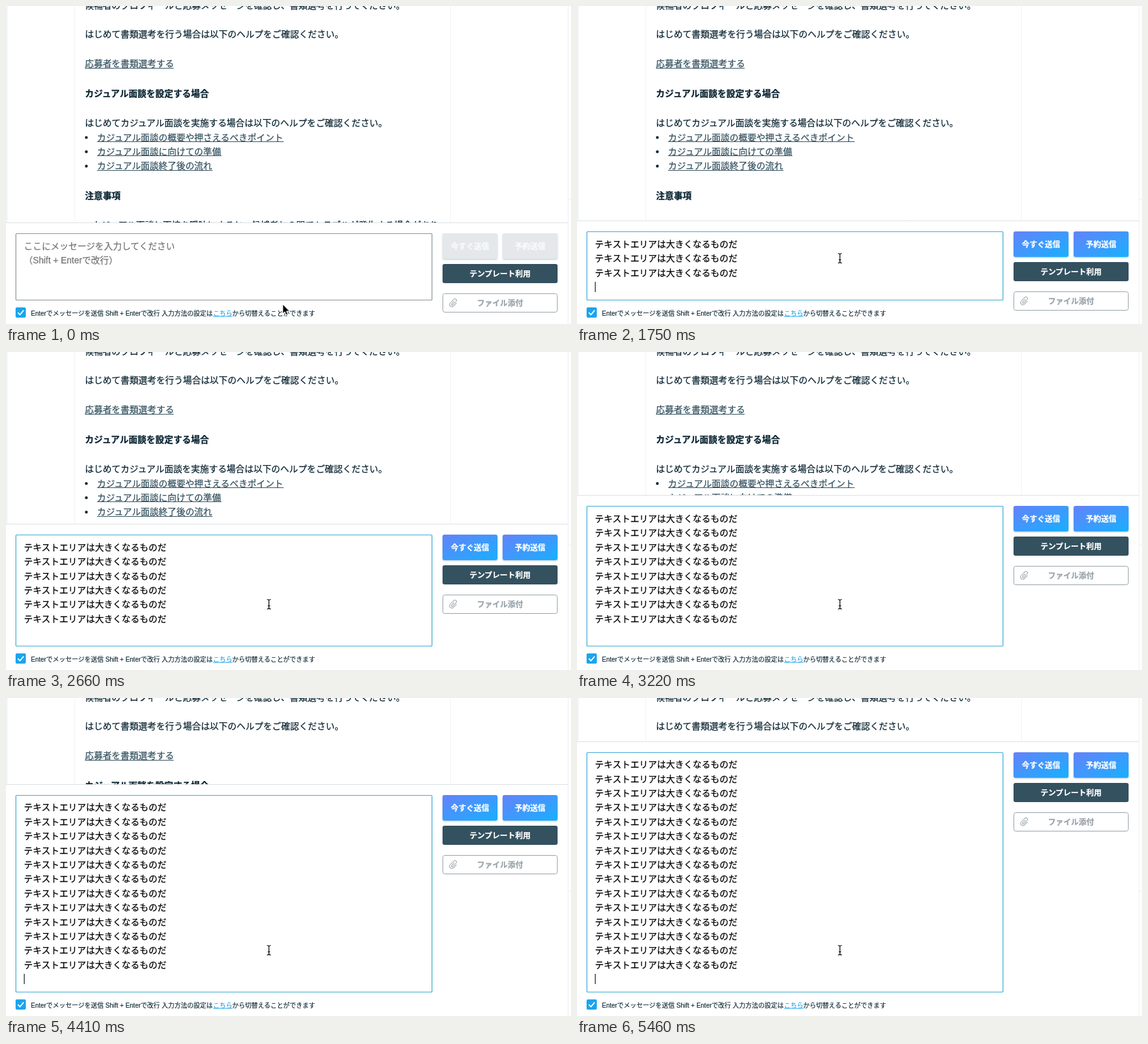
Recreate the animation shown at these times as an HTML page. Size 884x498 px, loop 5.6 s.

```html
<!DOCTYPE html>
<html lang="ja">
<head>
<meta charset="utf-8">
<style>
  html, body { margin: 0; width: 100%; height: 100%; overflow: hidden; background: #fff; }
  svg { display: block; width: 100vw; height: 100vh; }
  text {
    font: 13.96px "Liberation Sans", "Noto Sans CJK JP", "Noto Sans CJK", sans-serif;
    fill: var(--ink); stroke: var(--ink); stroke-width: .25px; white-space: pre; --ink: #0b2533;
  }
  .bold { font-weight: 700; }
  .link { --ink: #34515f; }
  .hint { --ink: #757575; }
  .typed { --ink: #000; }
  .button { font-size: 12px; font-weight: 700; --ink: #fff; text-anchor: middle; }
  .muted { --ink: #98a3a9; }
  .small { font-size: 10px; stroke-width: .15px; }
  .accent { --ink: #1ba5ee; }
</style>
</head>
<body>
<svg viewBox="0 0 884 498">
  <defs>
    <linearGradient id="blue" x1="0" y1="0" x2="1" y2="1">
      <stop offset="0" stop-color="#6482fa"/><stop offset="1" stop-color="#18b0ff"/>
    </linearGradient>
    <linearGradient id="edge">
      <stop offset="0" stop-color="#e9f0f1"/><stop offset="1" stop-color="#fff"/>
    </linearGradient>
    <filter id="shadow" x="-10%" y="-10%" width="120%" height="140%">
      <feDropShadow dx="0" dy="1.2" stdDeviation="1" flood-color="#2a5f85" flood-opacity=".32"/>
    </filter>
    <path id="beamShape" d="M-3 -7.5Q0 -7.5 0 -5.5Q0 -7.5 3 -7.5M0 -5.5V5.5M-3 7.5Q0 7.5 0 5.5Q0 7.5 3 7.5M-1.8 2.5H1.8"/>
  </defs>

  <rect width="884" height="498" fill="#fff"/>
  <rect width="4" height="498" fill="url(#edge)"/>
  <path d="M107.5 0V498M695.5 0V498" stroke="#f1f3f4"/>
  <path d="M879.5 0V498M879 302.5H884" stroke="#eceff0"/>
  <g id="article"></g>

  <rect id="panel" width="879" height="498" fill="#fff"/>
  <rect id="divider" width="879" height="1" fill="#dde2e5"/>
  <rect id="field" x="15.5" width="651" rx="1" fill="#fff" stroke-width="1.2"/>
  <g id="hint"></g>
  <g id="typed"></g>
  <rect id="caret" x="28" width="1" height="16" fill="#000"/>

  <g id="actions">
    <g id="send" filter="url(#shadow)">
      <rect x="683" width="86" height="40" rx="3"/>
      <rect x="777" width="86" height="40" rx="3"/>
    </g>
    <rect x="683" y="48" width="180" height="30" rx="3" fill="#34515f"/>
    <rect x="683.5" y="94.5" width="179" height="29" rx="3" fill="#fff" stroke="#98a3a9"/>
    <path transform="translate(700 109) rotate(45)" fill="none" stroke="#98a3a9" stroke-linecap="round"
      d="M3.5 -3V3.5A3.5 3.5 0 0 1 -3.5 3.5V-4.5A2.4 2.4 0 0 1 1.3 -4.5V3A1.1 1.1 0 0 1 -1 3V-2.5"/>
  </g>

  <g id="footer">
    <rect x="15" y="472" width="16" height="16" rx="2" fill="#1ba5ee"/>
    <path d="M18.5 480.2L21.8 483.5L27.6 476.6" fill="none" stroke="#fff" stroke-width="1.8"/>
  </g>

  <path id="arrow" transform="translate(433 467)" d="M0 0V15L3.4 11.8L5.7 17L8.2 16L5.9 10.9H10.6Z" fill="#000" stroke="#fff"/>
  <g id="beam" fill="none">
    <use href="#beamShape" stroke="#fff" stroke-width="3"/>
    <use href="#beamShape" stroke="#000" stroke-width="1.2"/>
  </g>
</svg>
<script>
const LOOP = 5600, PITCH = 22.4, BOTTOM = 461, FIRST_LINE = 19.4;
const $ = id => document.getElementById(id);

function add(parent, tag, attrs, content = '') {
  const node = document.createElementNS('http://www.w3.org/2000/svg', tag);
  for (const key in attrs) node.setAttribute(key, attrs[key]);
  node.textContent = content;
  parent.append(node);
  return node;
}

// y is the middle of the line, size the height of its characters
function label(parent, x, y, content, cls = '', size = 14) {
  return add(parent, 'text', { x, y: y + size * 0.375, class: cls }, content);
}

function link(parent, x, y, content) {
  label(parent, x, y, content, 'link');
  add(parent, 'rect', { x, y: Math.floor(y + 7), width: content.length * 13.93 - 0.5, height: 1, fill: '#34515f' });
}

const article = $('article');
label(article, 123.5, -1.5, '候補者のプロフィールと応募メッセージを確認し、書類選考を行ってください。');
label(article, 123.5, 43.8, 'はじめて書類選考を行う場合は以下のヘルプをご確認ください。');
link(article, 123.5, 90.2, '応募者を書類選考する');
label(article, 123.5, 136.8, 'カジュアル面談を設定する場合', 'bold');
label(article, 123.5, 183.2, 'はじめてカジュアル面談を実施する場合は以下のヘルプをご確認ください。');
['カジュアル面談の概要や押さえるべきポイント', 'カジュアル面談に向けての準備', 'カジュアル面談終了後の流れ']
  .forEach((title, i) => {
    const y = 205.4 + i * 22.4;
    add(article, 'circle', { cx: 125.7, cy: y + 0.5, r: 2.2, fill: '#0b2533' });
    link(article, 142.5, y, title);
  });
label(article, 123.5, 296.8, '注意事項', 'bold');
label(article, 126.5, 343, '- カジュアル面談と面接を曖昧にすると、候補者との間でトラブルが発生する場合があり');

label($('hint'), 28, 375.4, 'ここにメッセージを入力してください', 'hint');
label($('hint'), 28, 397.8, '（Shift + Enterで改行）', 'hint');

const sendLabels = [[726, '今すぐ送信'], [820, '予約送信']]
  .map(([x, name]) => label($('actions'), x, 20, name, 'button', 12));
label($('actions'), 773, 63, 'テンプレート利用', 'button', 12);
label($('actions'), 773, 109, 'ファイル添付', 'button muted', 12);

const footer = $('footer');
label(footer, 39, 481.2, 'Enterでメッセージを送信 Shift + Enterで改行 入力方法の設定は', 'small', 10);
label(footer, 324, 481.2, 'こちら', 'small accent', 10);
add(footer, 'rect', { x: 324, y: 485.5, width: 30, height: 1, fill: '#1ba5ee' });
label(footer, 354, 481.2, 'から切替えることができます', 'small', 10);

const lines = Array.from({ length: 15 }, (_, i) =>
  label($('typed'), 28, FIRST_LINE + i * PITCH, 'テキストエリアは大きくなるものだ', 'typed'));

// [time, finished lines, caret visible]
const STEPS = [
  [0, 0, 0], [350, 0, 1], [910, 0, 0], [1260, 1, 1], [1540, 2, 1], [1750, 3, 1],
  [2100, 4, 0], [2170, 4, 1], [2380, 5, 1], [2660, 6, 0], [2800, 6, 1], [2940, 7, 1],
  [3220, 8, 0], [3290, 8, 1], [3500, 9, 0], [3570, 9, 1], [3780, 10, 1], [3850, 10, 0],
  [4130, 11, 0], [4410, 12, 1], [4690, 13, 0], [4900, 13, 1], [5040, 14, 1],
  [5390, 15, 0], [5460, 15, 1]
];

// [time, x, y] of the text pointer
const POINTER = [[70, 424, 432], [140, 411.4, 395]];

const at = (table, t) => table.filter(row => row[0] <= t).pop();
const show = (node, on) => node.setAttribute('visibility', on ? 'visible' : 'hidden');
const move = (node, x, y) => node.setAttribute('transform', `translate(${x} ${y})`);

function draw(t) {
  const [, count, caret] = at(STEPS, t);
  const exactTop = BOTTOM - Math.max(105, (count + 1) * PITCH + 18);
  const top = Math.round(exactTop);

  $('panel').setAttribute('y', top - 17);
  $('divider').setAttribute('y', top - 17);
  $('field').setAttribute('y', top + 0.5);
  $('field').setAttribute('height', BOTTOM - top - 1);
  $('field').setAttribute('stroke', t < 280 ? '#8b9599' : '#3daad6');
  move($('actions'), 0, top);
  $('send').setAttribute('fill', count ? 'url(#blue)' : '#e4e8eb');
  sendLabels.forEach(node => node.style.setProperty('--ink', count ? '#fff' : '#f9fafb'));

  show($('hint'), !count);
  move($('typed'), 0, exactTop);
  lines.forEach((line, i) => show(line, i < count));
  show($('caret'), caret);
  $('caret').setAttribute('y', Math.round(exactTop + FIRST_LINE + count * PITCH - 8));

  const pointer = at(POINTER, t);
  show($('arrow'), !pointer);
  show($('beam'), pointer);
  if (pointer) move($('beam'), pointer[1], pointer[2]);
}

const start = performance.now();
function tick() {
  draw((performance.now() - start) % LOOP);
  requestAnimationFrame(tick);
}
tick();
</script>
</body>
</html>
```
